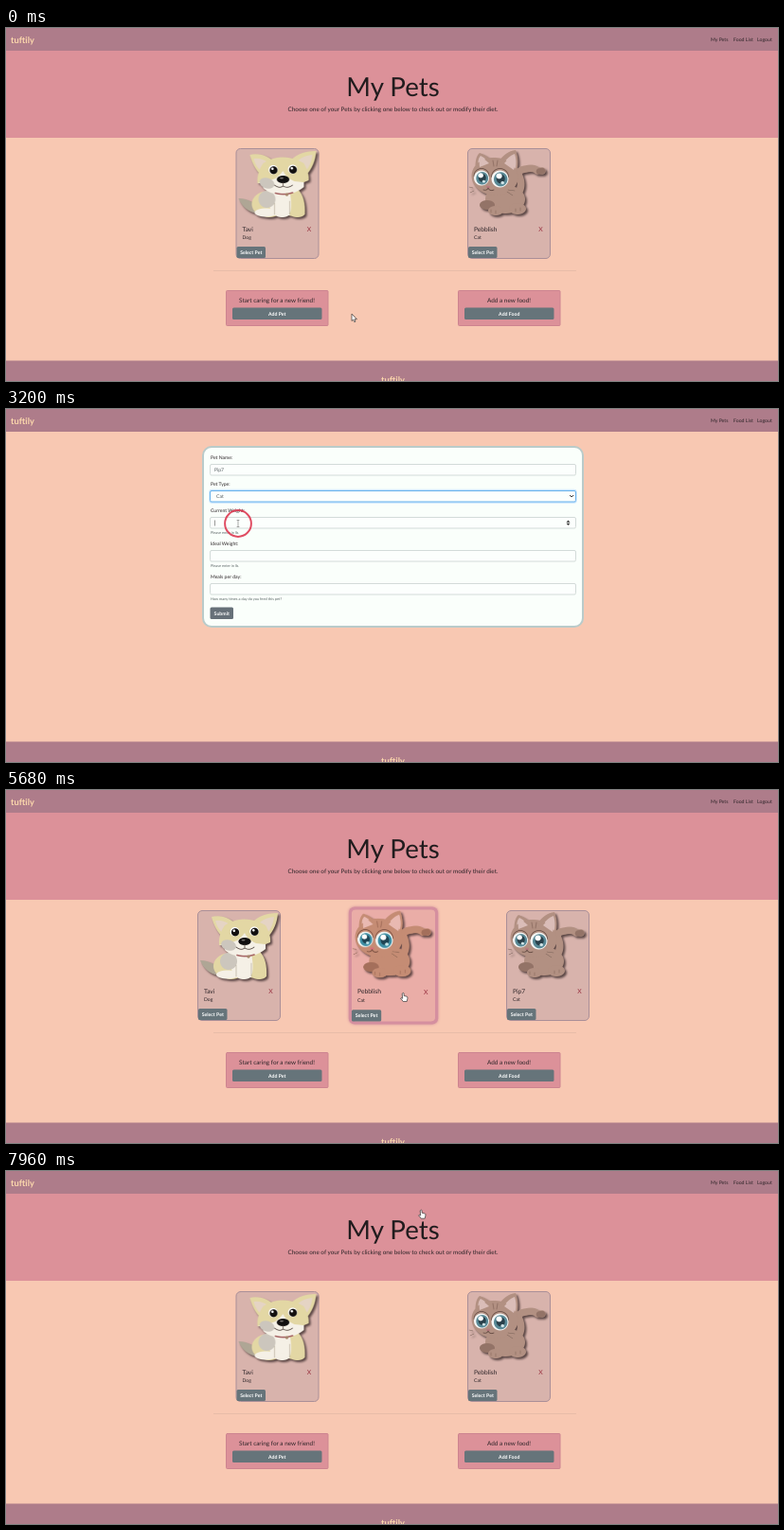
Recreate the animation shown at these times as an HTML page with a canvas. Size 815 px wide and 373 px high, loop 8 s.

```html
<!DOCTYPE html>
<html lang="en">
<head>
<meta charset="utf-8">
<title>My Pets</title>
<style>
  html, body { margin: 0; width: 100%; height: 100%; overflow: hidden; background: #f8c8b2; }
  canvas { display: block; width: 815px; height: 373px; }
</style>
</head>
<body>
<canvas id="stage" width="815" height="373"></canvas>
<script>
const LOOP = 8000;
const FORM_AT = 720, SAVED_AT = 4960, DIALOG_AT = 6440, REMOVED_AT = 7360;
const SLATE = '#66747a', PINK = '#dc9199', MAUVE = '#ae7c8a', INK = '#2d2428';
const BRAND = 'tuftily', NEW_PET = 'Pip7';

const stage = document.getElementById('stage').getContext('2d');
stage.imageSmoothingQuality = 'high';
stage.textRendering = 'geometricPrecision';
let ctx = stage;

// Pointer keys: time, x, y
const path = [
  [0, 365, 302.5], [120, 365, 302.5], [480, 290, 301], [760, 290, 301], [1160, 262, 66],
  [1960, 262, 66], [2280, 251.5, 94.5], [2840, 251.5, 94.5], [3160, 245, 121], [3680, 245, 121],
  [3960, 236, 158], [4160, 236, 158], [4400, 235, 191], [4640, 235, 191], [4820, 230, 216],
  [5120, 230, 216], [6240, 607, 212.5], [6460, 607, 212.5], [6920, 469, 26], [7000, 469, 26],
  [7240, 438, 41], [LOOP, 438, 41]
];
const clicks = [520, 1200, 2180, 3200, 4000, 4440, 4860, 6290, 7290];

const fields = [
  { label: 'Pet Name:', y: 58, focus: 1200, typed: [[1480, 'P'], [1640, 'Pi'], [1720, 'Pip'], [1960, NEW_PET]] },
  { label: 'Pet Type:', y: 86, focus: 2180, typed: [[2760, 'Cat']], select: true },
  { label: 'Current Weight:', y: 114, focus: 3200, typed: [[3560, '9']], help: 'Please enter in lb.' },
  { label: 'Ideal Weight:', y: 149, focus: 4000, typed: [[4240, '8']], help: 'Please enter in lb.' },
  { label: 'Meals per day:', y: 184, focus: 4440, typed: [[4640, '3']], help: 'How many times a day do you feed this pet?' }
];

const clamp = v => Math.max(0, Math.min(1, v));
const smooth = v => v * v * (3 - 2 * v);
const mix = (a, b, k) => `rgb(${a.map((v, i) => v + (b[i] - v) * k)})`;

function pointerAt(t) {
  const i = Math.max(1, path.findIndex(key => key[0] >= t));
  const [t0, x0, y0] = path[i - 1], [t1, x1, y1] = path[i];
  const k = smooth(clamp((t - t0) / (t1 - t0)));
  return { x: x0 + (x1 - x0) * k, y: y0 + (y1 - y0) * k };
}

function paint(fill, stroke, width = 1) {
  if (fill) { ctx.fillStyle = fill; ctx.fill(); }
  if (stroke) { ctx.strokeStyle = stroke; ctx.lineWidth = width; ctx.stroke(); }
}

function box(x, y, w, h, r, fill, stroke, width) {
  ctx.beginPath();
  ctx.roundRect(x, y, w, h, r);
  paint(fill, stroke, width);
}

function oval(x, y, rx, ry, fill, turn = 0) {
  ctx.beginPath();
  ctx.ellipse(x, y, rx, ry, turn, 0, 7);
  paint(fill);
}

function shape(d, fill, stroke, width) {
  const p = new Path2D(d);
  if (fill) { ctx.fillStyle = fill; ctx.fill(p); }
  if (stroke) {
    ctx.strokeStyle = stroke;
    ctx.lineWidth = width;
    ctx.lineCap = ctx.lineJoin = 'round';
    ctx.stroke(p);
  }
}

function text(str, x, y, size, color = INK, align = 'left', style = '', family = 'Lato') {
  ctx.font = `${style} ${size}px ${family}, sans-serif`;
  ctx.fillStyle = color;
  ctx.textAlign = align;
  ctx.fillText(str, x, y);
}

function button(str, x, y, w, h, fill = SLATE) {
  box(x, y, w, h, 1.5, fill);
  text(str, x + w / 2, y + h / 2 + 1.8, 5.2, '#fff', 'center', 'bold');
}

// Pets are drawn once, in card coordinates
function sprite(draw) {
  const canvas = document.createElement('canvas');
  canvas.width = 88 * 4;
  canvas.height = 80 * 4;
  ctx = canvas.getContext('2d');
  ctx.scale(4, 4);
  draw();
  ctx = stage;
  return canvas;
}

const dog = sprite(() => {
  const fur = '#ecd882', pale = '#f8f0df', shade = '#b5a58a', grey = '#cfc6b6';
  shape('M3 53 Q12 53 22 60 L22 69 Q8 66 3 53Z', shade);
  oval(35, 59, 18, 14, fur);
  shape('M34 44 H66 Q74 52 73 70 Q66 74 56 71 H40 Q32 60 34 44Z', fur);
  shape('M35 46 H57 Q60 60 57 71 H40 Q33 60 35 46Z', pale);
  oval(33, 54, 9, 9, grey, .3);
  oval(32, 68, 12, 4.5, pale);
  oval(49, 69, 8, 4, pale);
  oval(65, 69, 8, 4, fur);
  shape('M15 7 Q28 4 39 13 L27 29 Q18 20 15 7Z', fur);
  shape('M19 11 Q27 10 34 15 L28 25 Q21 20 19 11Z', '#efd2b8');
  shape('M85 3 Q68 3 59 12 L74 29 Q84 18 85 3Z', fur);
  shape('M81 7 Q71 8 66 13 L74 24 Q80 17 81 7Z', '#efd2b8');
  shape('M29 16 Q49 3 72 16 Q78 27 77 34 L72 36 L72 41 Q62 49 50 49 Q36 49 29 42 L28 37 L23 37 Q22 26 29 16Z', fur);
  shape('M50 24 Q53 31 62 35 L72 36 L72 41 Q62 49 50 49 Q36 49 29 42 L28 37 L23 37 Q34 35 42 32 Q47 28 50 24Z', pale);
  oval(33, 37, 8, 5.5, grey, .3);
  for (const [x, y] of [[40, 23], [60.5, 22.5]]) {
    oval(x - .4, y - .2, 4.9, 4.9, '#fff');
    oval(x, y + .3, 4.1, 4.1, '#15100e');
    oval(x - 1.2, y - 1.3, 1.3, 1.3, '#fff');
  }
  oval(50, 33, 6.6, 4, '#120f0e');
  oval(48.5, 31.7, 2, .8, '#77706a');
  shape('M50 36 V40 M41 39 Q46 43 50 40 Q55 43 60 39', null, '#594339', .8);
  shape('M42 47.5 Q51 50 60 47', null, '#c95d5c', 1.6);
  oval(54, 49, 1.7, 1.7, '#b98155');
  shape('M41 58 V70 M57 56 V70', null, '#b3a382', .6);
});

const cat = sprite(() => {
  const fur = '#c58c74', dark = '#a46f5b', pink = '#e9b9b1';
  shape('M50 53 Q60 42 55 30 Q52 23 62 22 Q70 20 74 24 L79 24', null, fur, 7.5);
  shape('M76 24.5 L79 24', null, dark, 6.5);
  oval(40, 54, 21, 15, fur);
  oval(21, 60, 8, 5, dark);
  oval(30, 66, 8, 5, fur);
  oval(53, 64, 9, 6, fur);
  shape('M25 68 V65 M30 69 V66 M51 67 V64 M56 66 V63', null, dark, .8);
  shape('M9 27 Q7 10 13 5 Q22 8 29 16Z', fur);
  shape('M12 23 Q10 12 14 8 Q20 11 25 17Z', pink);
  shape('M33 14 Q41 3 51 2 Q56 14 51 29Z', fur);
  shape('M38 16 Q44 8 50 6 Q53 15 50 25Z', pink);
  oval(29, 30, 24.5, 20, fur, .1);
  shape('M39 16 Q45 9 49.5 7 Q51.5 15 49 23Z M13 20 Q12 13 14.5 9.5 Q19 12 23 16Z', pink);
  shape('M27 13 L28 19 M32 13 L31 19', null, dark, 1);
  for (const [x, y, r] of [[15, 31.5, 8], [34.5, 32.5, 9]]) {
    oval(x, y, r, r, '#f1f6f5');
    oval(x + .7, y + .3, r * .8, r * .84, '#3d8ea4');
    oval(x + .7, y - .2, r * .5, r * .55, '#1d4353');
    oval(x - r * .1, y - r * .34, r * .34, r * .32, '#fff');
    oval(x + r * .3, y + r * .45, r * .2, r * .18, '#c5e6ea');
    shape(`M${x - r} ${y - 2} A${r} ${r} 0 0 1 ${x + r} ${y - 2}`, null, '#6e4639', .7);
  }
  oval(22, 41, 2, 1.3, '#d9707b');
  shape('M22 42 Q21 45 17 44 M22 42 Q24 46 28 44', null, '#6e4639', .8);
  shape('M6 42 L2 41 M7 45 L3 47 M43 44 L50 45 M42 46 L48 50', null, '#85604f', .5);
});

const oldPets = [{ name: 'Tavi', kind: 'Dog', art: dog }, { name: 'Pebblish', kind: 'Cat', art: cat }];
const allPets = [...oldPets, { name: NEW_PET, kind: 'Cat', art: cat }];

function petsAt(t) {
  const three = t >= SAVED_AT && t < REMOVED_AT;
  const left = three ? [202, 365, 528] : [242.5, 487];
  return (three ? allPets : oldPets).map((pet, i) => ({ ...pet, x: left[i] }));
}

const within = (p, x, y, w, h) => p.x >= x && p.x <= x + w && p.y >= y && p.y <= y + h;
const overCard = (pet, t) => within(pointerAt(t), pet.x, 127, 88, 117);

// Averaging recent hits gives the short hover fade without keeping state
const hoverAmount = (pet, t) =>
  [0, 20, 40, 60].reduce((sum, lag) => sum + overCard(pet, Math.max(0, t - lag)) / 4, 0);

function drawCard(pet, t) {
  const k = hoverAmount(pet, t), grow = 1 + .025 * k;
  ctx.save();
  ctx.translate(pet.x + 44, 185.5);
  ctx.scale(grow, grow);
  ctx.translate(-44, -58.5);
  if (k) {
    ctx.save();
    ctx.globalAlpha = k;
    ctx.shadowColor = '#cf8a9a';
    ctx.shadowBlur = 3;
    box(-2, -2, 92, 121, 6, '#d58f9f');
    ctx.restore();
  }
  box(.5, .5, 87, 116, 4.5, mix([216, 179, 172], [234, 173, 167], k), mix([170, 143, 152], [213, 143, 159], k));
  ctx.save();
  ctx.filter = `saturate(${.6 + .4 * k})`;
  ctx.shadowColor = 'rgba(50,35,35,.75)';
  ctx.shadowBlur = 2.5;
  ctx.shadowOffsetX = 2;
  ctx.shadowOffsetY = 2;
  ctx.drawImage(pet.art, 0, 0, 88, 80);
  ctx.restore();
  text(pet.name, 7, 87.5, 6.6);
  text(pet.kind, 7, 96, 5.1);
  text('X', 77.5, 87.8, 6.8, '#98303f', 'center');
  button('Select Pet', 1, 104, 30.5, 12);
  ctx.restore();
}

function drawAddBox(x, title, label) {
  box(x + .5, 277.5, 107.5, 37, 1, PINK, '#cd8490');
  text(title, x + 54, 290.3, 6.4, INK, 'center');
  button(label, x + 7, 295.5, 94.5, 12.5);
}

function drawPetsPage(t) {
  ctx.fillStyle = PINK;
  ctx.fillRect(0, 24, 815, 92);
  text('My Pets', 408.5, 72, 27.7, '#211c1e', 'center');
  text('Choose one of your Pets by clicking one below to check out or modify their diet.', 408.5, 88, 6.35, INK, 'center');
  ctx.fillStyle = '#e8bca8';
  ctx.fillRect(219, 256, 383, 1);
  petsAt(t).forEach(pet => drawCard(pet, t));
  drawAddBox(232, 'Start caring for a new friend!', 'Add Pet');
  drawAddBox(477, 'Add a new food!', 'Add Food');
}

function drawField(field, next, t, pointer) {
  const { y } = field;
  const fade = start => clamp((t - start - 40) / 120);
  const focus = fade(field.focus) * (1 - (next ? fade(next.focus) : 0));
  const value = field.typed.filter(([at]) => t >= at).pop()?.[1] ?? '';
  text(field.label, 216, y - 4.7, 5.1);
  if (focus) box(215.5, y, 386, 12.5, 2, null, `rgba(128,189,255,${.4 * focus})`, 2.5);
  box(215.5, y + .5, 386, 11.5, 1.5, '#fcfffd', mix([211, 219, 217], [105, 178, 235], focus));
  text(value, field.select ? 222 : 220, y + 8.2, 5.1, '#555c60');
  if (field.select) shape(`M595.5 ${y + 5.3} l1.7 1.7 l1.7 -1.7`, null, '#222', 1);
  else if (t >= field.focus && !(next && t >= next.focus)) {
    ctx.fillStyle = '#555';
    ctx.fillRect(220 + ctx.measureText(value).width, y + 3.5, .6, 6);
  }
  if (field.help) {
    text(field.help, 216, y + 18, 3.9, '#5d6668');
    if (within(pointer, 216, y, 386, 12)) {
      shape(`M591.5 ${y + 5.7} l2 -2.2 l2 2.2Z M591.5 ${y + 6.8} l2 2.2 l2 -2.2Z`, '#333');
    }
  }
}

function drawFormPage(t, pointer) {
  box(208, 40, 401, 190, 9, '#fafffb', '#b9cbca', 2);
  fields.forEach((field, i) => drawField(field, fields[i + 1], t, pointer));
  button('Submit', 215.5, 209.5, 24.5, 12.5, '#667078');
}

function drawDialog(t) {
  const shown = smooth(clamp((t - DIALOG_AT) / 160)) * (1 - smooth(clamp((t - REMOVED_AT) / 160)));
  if (!shown) return;
  const sans = '"Liberation Sans"';
  ctx.save();
  ctx.translate(0, (shown - 1) * 56);
  ctx.save();
  ctx.shadowColor = 'rgba(0,0,0,.3)';
  ctx.shadowBlur = 4;
  ctx.shadowOffsetY = 1;
  box(342, 7, 134, 43.5, 1, '#e7ca13');
  ctx.restore();
  let x = 345;
  for (const [part, style] of [['Are you ', ''], ['sure', 'italic'], [' you want to', '']]) {
    text(part, x, 19, 9, '#fff', 'left', style, sans);
    x += ctx.measureText(part).width;
  }
  text(`remove ${NEW_PET}?`, 345, 30, 9, '#fff', 'left', '', sans);
  box(345, 34.5, 72, 12.5, 1.5, '#cb1c2e');
  text(`No, keep my precious ${NEW_PET}!`, 381, 42.6, 5, '#fff', 'center', 'bold', sans);
  box(421.5, 34.5, 40.5, 12.5, 1.5, '#28b44a');
  text('Yes, Remove.', 441, 42.6, 5, '#fff', 'center', 'bold', sans);
  text('×', 468.5, 17.5, 9, '#fff', 'center', '', sans);
  ctx.restore();
}

function pointerKind(t, p) {
  if (t >= FORM_AT && t < SAVED_AT) {
    if (within(p, 216, 209, 24, 13)) return 'hand';
    return fields.some(f => !f.select && within(p, 216, f.y, 386, 12)) ? 'beam' : 'arrow';
  }
  const hot = petsAt(t).some(pet => overCard(pet, t)) || within(p, 239, 296, 94, 12);
  return hot || t >= 6880 ? 'hand' : 'arrow';
}

function drawPointer(t, p) {
  for (const at of clicks) {
    const age = (t - at) / 200;
    if (age < 0 || age > 1) continue;
    ctx.globalAlpha = .9 * (1 - age * age);
    ctx.beginPath();
    ctx.arc(p.x, p.y, 13.9, 0, 7);
    paint(null, '#dc3850', 2);
    ctx.globalAlpha = 1;
  }
  ctx.save();
  ctx.translate(p.x, p.y);
  const kind = pointerKind(t, p);
  if (kind === 'beam') shape('M-1 -3.5 H1 M0 -3.5 V3.5 M-1 3.5 H1', null, '#777', .6);
  else if (kind === 'arrow') shape('M0 0 V7 L1.6 5.6 L2.8 8.2 L4 7.6 L2.9 5.2 H5Z', '#fff', '#333', .7);
  else shape('M-.6 .6 Q.3 -.6 1.1 .6 V3.2 L4.3 4 Q5.2 4.3 4.9 6 L4.2 9.2 H.2 L-2.4 5.8 Q-2.3 4.6 -.6 5.8Z', '#fff', '#333', .7);
  ctx.restore();
}

function drawChrome() {
  ctx.fillStyle = MAUVE;
  ctx.fillRect(0, 0, 815, 24);
  ctx.fillRect(0, 351.5, 815, 22);
  text(BRAND, 5, 16, 9.3, '#fbd7ac', 'left', 'bold');
  text(BRAND, 408.5, 374.5, 9.3, '#fbd7ac', 'center', 'bold');
  text('My Pets', 744, 13.8, 5.2);
  text('Food List', 768, 13.8, 5.2);
  text('Logout', 793, 13.8, 5.2);
}

function frame(now) {
  const t = now % LOOP, pointer = pointerAt(t);
  ctx.fillStyle = '#f8c8b2';
  ctx.fillRect(0, 0, 815, 373);
  drawChrome();
  if (t >= FORM_AT && t < SAVED_AT) drawFormPage(t, pointer);
  else drawPetsPage(t);
  drawDialog(t);
  drawPointer(t, pointer);
  requestAnimationFrame(frame);
}
requestAnimationFrame(frame);
</script>
</body>
</html>
```
